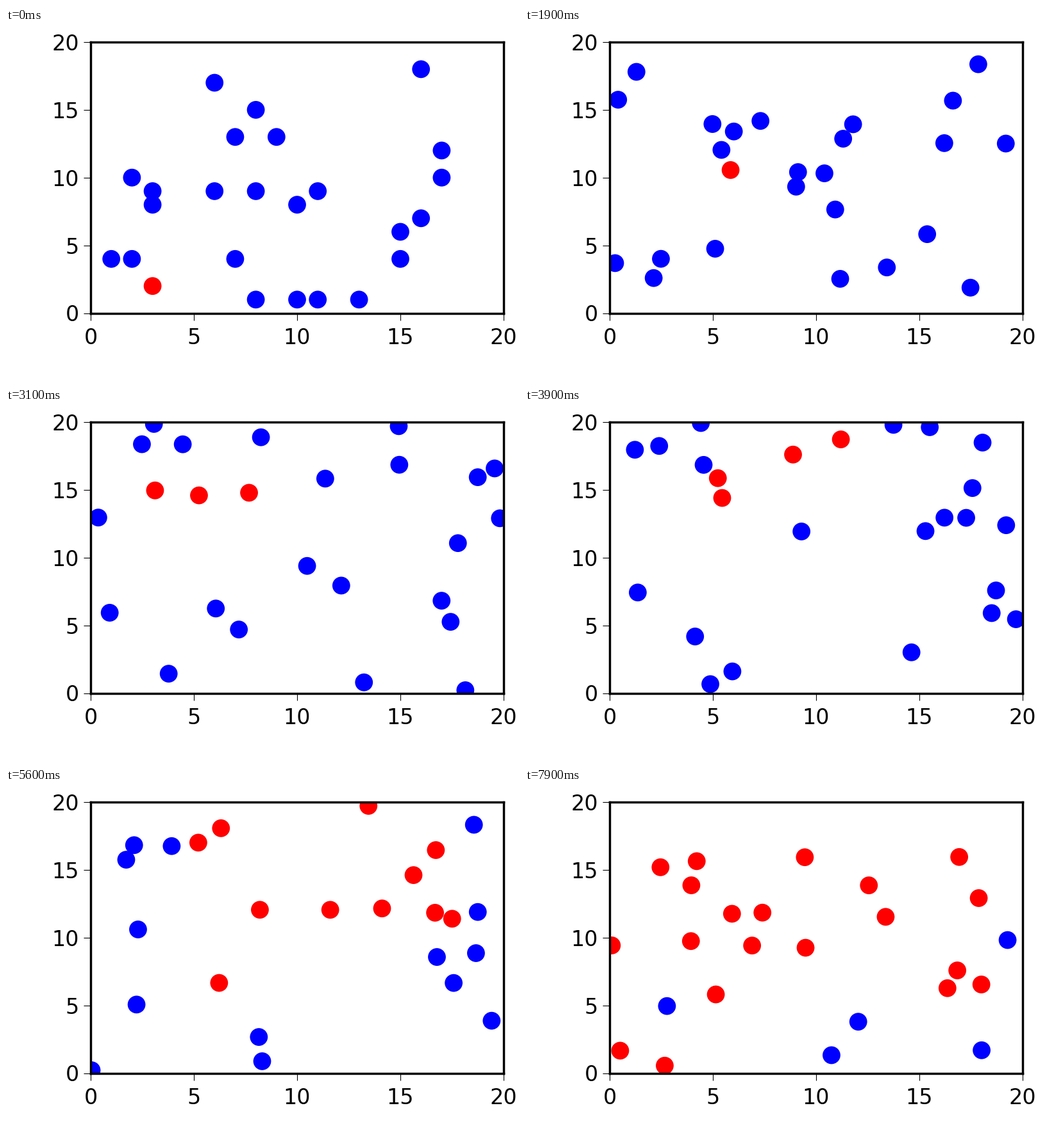
A matplotlib script that plays this animation: 800 by 550 pixels, repeating every 8000 ms.

```python
import numpy as np
import matplotlib.pyplot as plt
from matplotlib.animation import FuncAnimation

STEPS = 80
SIZE = 20
DIAMETER = 1
MAX_SPEED = 0.6
SUBSTEPS = 4
HALF_SICK, SPREAD_TIME = 60.3, 13.5
HEALTHY, SICK = "#0000ff", "#ff0000"

# The first dot is the one that starts sick.
START = np.array([
    (3, 2), (1, 4), (2, 4), (2, 10), (3, 9), (3, 8), (6, 17), (6, 9), (7, 13),
    (7, 4), (8, 15), (8, 9), (8, 1), (9, 13), (10, 8), (10, 1), (11, 9), (11, 1),
    (13, 1), (15, 6), (15, 4), (16, 18), (16, 7), (17, 12), (17, 10),
], dtype=float)


def collide(pos, vel):
    """Elastic hits between equal discs: swap speed along the line of contact."""
    for i in range(len(pos)):
        for j in range(i):
            gap = pos[i] - pos[j]
            dist = np.hypot(*gap)
            if dist > DIAMETER:
                continue
            normal = gap / dist
            closing = (vel[i] - vel[j]) @ normal
            if closing < 0:
                vel[i] -= closing * normal
                vel[j] += closing * normal


def move(pos, vel):
    for _ in range(SUBSTEPS):
        collide(pos, vel)
        pos += vel / SUBSTEPS
        outside = (pos < 0) | (pos > SIZE)
        vel[outside] *= -1
        pos[:] = SIZE - np.abs(SIZE - np.abs(pos))


def sick_total(step):
    """Logistic growth of the number of sick dots."""
    return max(1, round(len(START) / (1 + np.exp((HALF_SICK - step) / SPREAD_TIME))))


def spread(pos, sick, total):
    """The healthy dot closest to a sick one catches it next."""
    while sick.sum() < total:
        gaps = np.linalg.norm(pos[:, None] - pos[sick], axis=2).min(axis=1)
        gaps[sick] = np.inf
        sick[gaps.argmin()] = True


def simulate():
    rng = np.random.default_rng(7)
    pos = START.copy()
    vel = rng.uniform(-MAX_SPEED, MAX_SPEED, pos.shape)
    sick = np.arange(len(pos)) == 0
    history = []
    for step in range(STEPS):
        spread(pos, sick, sick_total(step))
        history.append((pos.copy(), np.where(sick, SICK, HEALTHY)))
        move(pos, vel)
    return history


history = simulate()

plt.rcParams.update({"font.family": "DejaVu Sans", "axes.linewidth": 2.5})
fig, ax = plt.subplots(figsize=(8, 5.5), dpi=100)
fig.subplots_adjust(left=0.165, right=0.97, bottom=0.19, top=0.96)
ticks = range(0, SIZE + 1, 5)
ax.set(xlim=(0, SIZE), ylim=(0, SIZE), xticks=ticks, yticks=ticks)
ax.tick_params(length=8, width=0.8, labelsize=24)
ax.tick_params(axis="x", pad=8)
ax.tick_params(axis="y", pad=5)

dots = ax.scatter(*START.T, s=400, linewidths=0)


def update(step):
    pos, colors = history[step]
    dots.set_offsets(pos)
    dots.set_facecolors(colors)
    return (dots,)


anim = FuncAnimation(fig, update, frames=STEPS, interval=100, repeat=True, repeat_delay=0)
plt.show()
```
